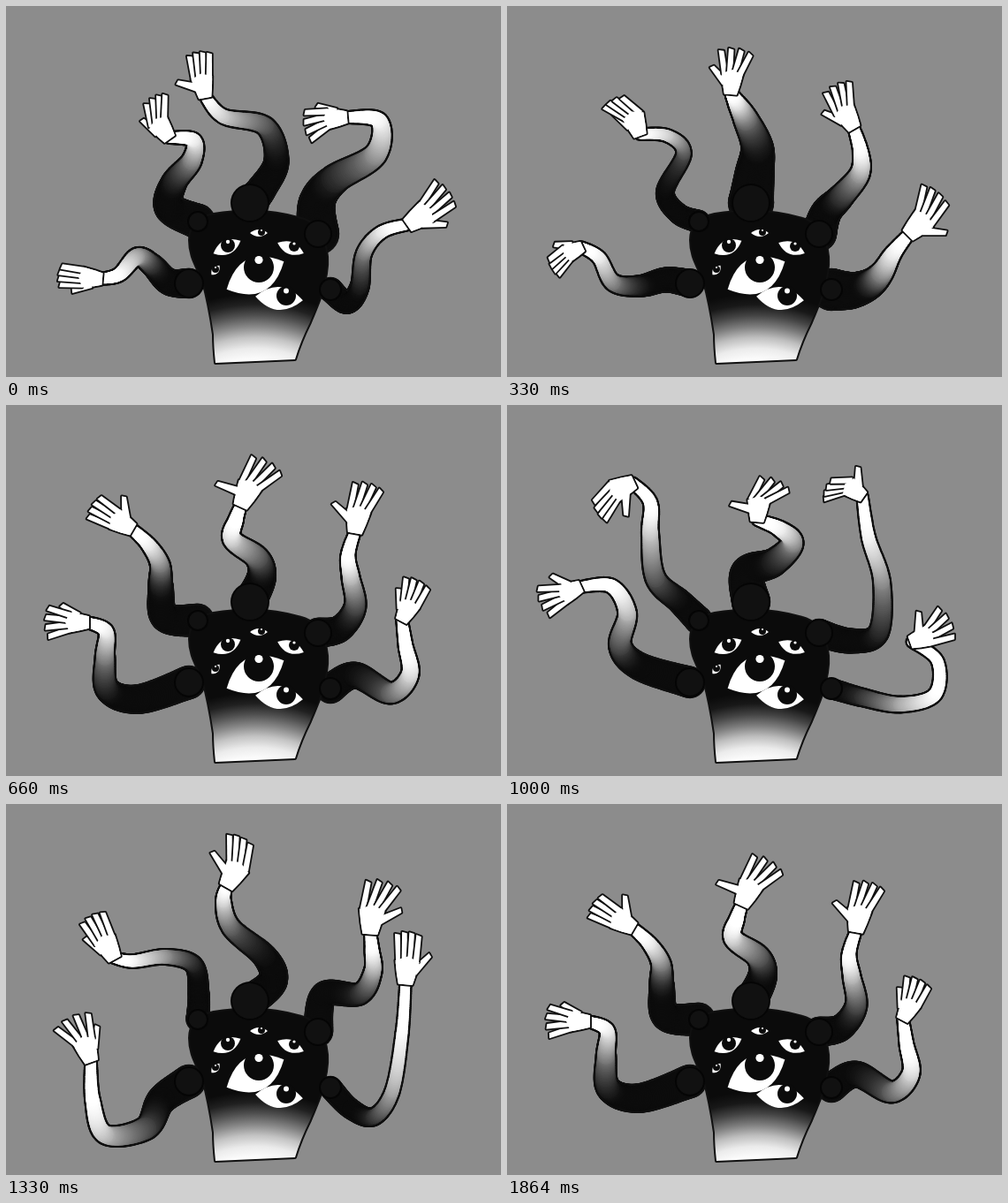
Write an HTML page with a canvas that moves like this. It is 560 by 420 pixels and loops after 2000 ms.

```html
<!DOCTYPE html>
<html lang="en">
<head>
<meta charset="utf-8">
<title>Many arms</title>
<style>
  html, body { margin: 0; width: 100%; height: 100%; overflow: hidden; background: #8c8c8c; }
  canvas { display: block; width: 560px; height: 420px; }
</style>
</head>
<body>
<canvas id="stage" width="560" height="420"></canvas>
<script>
const ctx = document.getElementById('stage').getContext('2d');
const INK = '#101010';
const WHITE = '#fff';
const LOOP = 2000;
const ORDER = [0, 1, 2, 3, 4, 2];
const poses = [];

// shoulder x, y, radius
const shoulders = [[217, 244, 11], [276, 223, 21], [353, 258, 15], [367, 321, 12], [207, 314, 16]];

const grey = v => `rgb(${v},${v},${v})`;
const rad = deg => deg * Math.PI / 180;
const ahead = (x, y, angle, d) => [x + d * Math.cos(angle), y + d * Math.sin(angle)];

// One line per arm: five spine points, shoulder width, where the grey turns,
// then the hand's angle, length, thumb angle, finger bend and finger spread.
function addPose(text) {
  poses.push(text.trim().split('\n').map((line, limb) => {
    const n = line.trim().split(/\s+/).map(Number);
    const points = [shoulders[limb].slice(0, 2)];
    for (let i = 0; i < 10; i += 2) points.push([n[i], n[i + 1]]);
    const [width, turn, ...hand] = n.slice(10);
    return { spine: smooth(points), width, turn, hand, wrist: points[5] };
  }));
}

// Catmull-Rom curve
function smooth(points, steps = 28) {
  const at = i => points[Math.max(0, Math.min(points.length - 1, i))];
  const out = [];
  for (let i = 0; i < points.length - 1; i++) {
    const [a, b, c, d] = [at(i - 1), at(i), at(i + 1), at(i + 2)];
    for (let s = 0; s <= steps; s++) {
      const t = s / steps;
      out.push(b.map((v, k) => v + t / 2 * (c[k] - a[k] +
        t * (2 * a[k] - 5 * v + 4 * c[k] - d[k] + t * (3 * (v - c[k]) + d[k] - a[k])))));
    }
  }
  return out;
}

addPose(`185 228 190 200 210 175 212 152 184 149 38 .65 -125 50 -15 30 5
  290 206 306 175 293 136 246 125 225 102 36 .72 -100 50 -65 5 4
  352 222 372 196 418 168 422 130 384 126 46 .62 175 48 25 -15 12
  386 336 400 318 405 280 425 256 456 247 26 .65 -35 58 38 -10 8
  184 312 165 293 148 284 128 304 107 309 32 .6 185 48 -25 0 3`);
addPose(`194 235 179 210 200 167 182 147 150 145 24 .72 -110 52 -30 -35 4
  280 190 283 160 270 128 260 110 253 98 50 .68 -85 50 -45 5 12
  361 234 378 216 399 190 400 165 392 137 38 .6 -120 52 -35 15 8
  390 322 410 315 424 302 437 280 455 258 46 .65 -45 58 50 -20 8
  180 310 150 317 120 313 104 285 84 273 30 .65 155 42 30 -20 5`);
addPose(`180 240 175 205 174 180 161 158 142 140 36 .65 210 52 55 0 5
  289 195 284 173 256 152 260 130 266 113 36 .52 -65 58 -95 15 10
  378 253 395 228 390 195 387 170 395 143 32 .55 -80 56 -55 12 7
  395 306 435 326 457 305 452 272 448 243 32 .5 -62 48 -35 -10 8
  150 333 115 322 112 285 113 256 92 246 36 .65 180 48 35 0 12`);
addPose(`196 223 168 196 162 145 162 110 142 88 30 .52 155 54 -65 -28 4
  272 190 302 178 323 156 308 140 283 130 42 .64 -85 52 -80 40 12
  388 267 420 258 424 200 409 150 402 103 30 .62 -145 46 55 -45 6
  402 331 445 339 484 328 487 290 458 268 22 .38 -20 50 -70 -15 14
  150 296 128 272 136 235 118 205 82 206 34 .55 155 48 55 5 12`);
addPose(`218 215 212 182 180 173 143 178 122 174 25 .62 -118 54 -25 0 5
  302 200 293 173 255 140 246 110 250 92 36 .7 -60 58 -65 -25 4
  360 216 400 215 415 190 414 165 412 145 32 .6 -85 60 60 20 9
  390 345 416 354 437 325 448 260 452 202 24 .58 -85 57 40 -3 3
  176 335 158 367 112 374 98 335 96 290 36 .55 -110 54 30 -10 15`);

function disc(x, y, r, color) {
  ctx.beginPath();
  ctx.arc(x, y, r, 0, 7);
  ctx.fillStyle = color;
  ctx.fill();
}

function shape(points) {
  const path = new Path2D();
  points.forEach(p => path.lineTo(...p));
  path.closePath();
  return path;
}

function inked(path, fill, width) {
  ctx.strokeStyle = INK;
  ctx.lineWidth = width;
  ctx.stroke(path);
  ctx.fillStyle = fill;
  ctx.fill(path);
}

function finger(x, y, angle, length, base, tip) {
  const [tx, ty] = ahead(x, y, angle, length);
  const side = angle + Math.PI / 2;
  inked(shape([
    ahead(x, y, side, -base), ahead(tx, ty, side, -tip),
    ahead(tx, ty, side + .5, tip), ahead(x, y, side, base)
  ]), WHITE, 3.6);
}

function drawHand([x, y], [angle, size, thumb, bend, spread]) {
  const dir = rad(angle);
  const local = (u, v) => ahead(...ahead(x, y, dir, u * size), dir + Math.PI / 2, v * size);
  const side = Math.sign(thumb);
  const palm = shape([
    local(-.04, -.14), local(.16, -.19), local(.42, -.24),
    local(.52, 0), local(.42, .24), local(.16, .19), local(-.04, .14)
  ]);
  inked(palm, WHITE, 4);
  finger(...local(.22, side * .14), dir + rad(thumb), size * .48, 4.5, 2.6);
  for (let i = 0; i < 4; i++) {
    const k = i - 1.5;
    const reach = size * (.6 - Math.abs(k) * .04);
    finger(...local(.42, k * .115), dir + rad(bend + spread * k), reach, 3.2, 3);
  }
  ctx.fill(palm);
}

function drawArm({ spine, width, turn, hand, wrist }) {
  const last = spine.length - 1;
  const radius = i => (width + (13 - width) * i / last) / 2;
  spine.forEach(([x, y], i) => disc(x, y, radius(i) + 1.2, INK));
  spine.forEach(([x, y], i) => {
    const t = Math.max(0, Math.min(1, (i / last - turn + .32) / .6));
    const tone = Math.round(12 + 243 * t * t * (3 - 2 * t));
    disc(x, y, radius(i) - 1.2, grey(tone));
  });
  drawHand(wrist, hand);
}

function eye(x, y, half, height, tilt, px, py, r) {
  ctx.save();
  ctx.translate(x, y);
  ctx.rotate(rad(tilt));
  ctx.beginPath();
  ctx.moveTo(-half, 0);
  ctx.quadraticCurveTo(0, -2 * height, half, 0);
  ctx.quadraticCurveTo(0, 2 * height, -half, 0);
  ctx.fillStyle = WHITE;
  ctx.fill();
  ctx.restore();
  disc(px, py, r, '#0b0b0b');
  disc(px, py - r * .5, r * .27, WHITE);
}

const torso = new Path2D('M237 404Q235 385 235 372C232 352 228 330 223 312C216 294 208 284 208 265Q208 242 235 236C270 230 305 232 334 241C360 248 366 280 362 303C358 328 350 343 344 358Q333 380 327 400Z');

function drawBody(variant) {
  const fade = ctx.createRadialGradient(282, 520, 120, 282, 520, 200);
  const tones = variant ? [252, 235, 190, 125, 68, 24, 11] : [252, 235, 195, 135, 80, 32, 11];
  tones.forEach((tone, i) => fade.addColorStop(i * .155, grey(tone)));
  inked(torso, fade, 4);
  for (const [x, y, r] of shoulders) {
    disc(x, y, r + 1, '#050505');
    disc(x, y, r - 1, '#111');
  }
  eye(286, 257, 10, 4, 0, 289, 256, 4);
  eye(250, 273, 17, 8, -25, 251, 271, 8);
  eye(322, 274, 16, 7, 22, 326, 272, 6);
  eye(282, 305, 36, 20, -26, 286, 296, 17);
  eye(237, 299, 7, 4, -50, 237, 298, 4);
  eye(309, 331, 27, 13, 5, 317, 328, 11);
}

function draw(step) {
  ctx.fillStyle = '#8c8c8c';
  ctx.fillRect(0, 0, 560, 420);
  poses[ORDER[step]].forEach(drawArm);
  drawBody(step % 2);
}

ctx.lineJoin = 'round';
let shown = -1;
function tick() {
  const time = performance.now() % LOOP;
  const step = [330, 660, 1000, 1330, 1660].filter(start => start <= time).length;
  if (step !== shown) draw(shown = step);
  requestAnimationFrame(tick);
}
tick();
</script>
</body>
</html>
```
